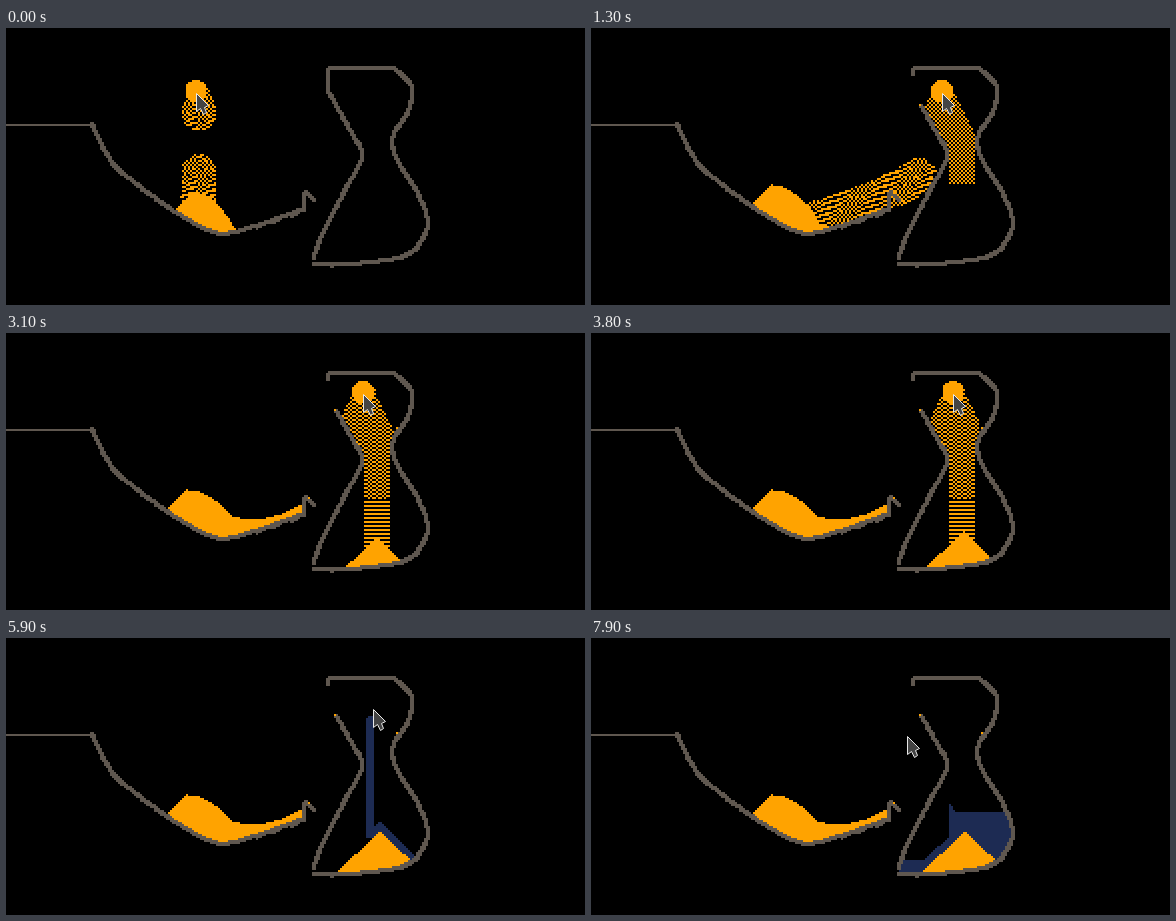
An HTML page with a canvas for the animation above (8 s loop, 579 by 277 pixels).

```html
<!DOCTYPE html>
<html lang="en">
<head>
<meta charset="utf-8">
<title>Falling sand</title>
<style>
html, body { margin: 0; width: 100%; height: 100%; overflow: hidden; background: #000; }
canvas { display: block; }
</style>
</head>
<body>
<canvas id="stage" width="579" height="277"></canvas>
<script>
const ctx = document.getElementById('stage').getContext('2d');
const LOOP = 8000, STEP = 100, CELL = 2, FALL = 0.14;
const SAND = '#ffa300', WATER = '#1d2b53', WALL = '#5f574f';
const POUR = 630, SAND_END = 3830, WATER_START = 4500, WATER_END = 6950;

const mix = (a, b, k) => a + (b - a) * k;
const ramp = (t, a, b) => Math.max(0, Math.min(1, (t - a) / (b - a)));
const easeOut = k => 1 - (1 - k) ** 2;

// Smooth curve through a few points
function spline(points) {
  const out = [], last = points.length - 1;
  for (let i = 0; i < last; i++) {
    const [a, b, c, d] = [i - 1, i, i + 1, i + 2].map(j => points[Math.max(0, Math.min(last, j))]);
    for (let u = 0; u < 1; u += 0.1) {
      out.push([0, 1].map(n => b[n] + u * (c[n] - a[n]) / 2
        + u * u * (a[n] - 2.5 * b[n] + 2 * c[n] - d[n] / 2)
        + u * u * u * (1.5 * (b[n] - c[n]) + (d[n] - a[n]) / 2)));
    }
  }
  return [...out, points[last]];
}

// Coordinate of a curve where its other axis has the value v
function cross(curve, v, axis) {
  const other = 1 - axis, i = curve.findIndex(p => p[axis] >= v);
  if (i < 0) return curve[curve.length - 1][other];
  if (i === 0) return curve[0][other];
  const p = curve[i - 1], q = curve[i];
  return mix(p[other], q[other], (v - p[axis]) / (q[axis] - p[axis]));
}
const yAt = (curve, x) => cross(curve, x, 0);
const xAt = (curve, y) => cross(curve, y, 1);

const bowl = spline([[86,95], [103,130], [125,152], [168,183], [200,201], [222,205], [255,196], [297,181]]);
const hook = [[297,181], [299,164], [307,171]];
const leftSide = spline([[330,77], [345,104], [356,128], [340,160], [318,203], [307,230]]);
const rightSide = spline([[388,40], [405,58], [402,84], [387,108], [391,132], [411,164], [422,195], [411,220]]);
const base = spline([[308,235], [326,237], [365,234], [395,229], [411,220]]);
const lid = [[322,46], [322,41], [330,40], [388,40]];
const lip = [[321,44], [322,62], [330,77]];

const tipX = t => 190 + 161 * easeOut(ramp(t, 330, 950)) + 11 * ramp(t, 2200, 3800)
  + 12 * ramp(t, 3800, 4500) - 7 * ramp(t, 4500, 4900) - 51 * ramp(t, 7000, 7900);
const tipY = t => 65 - 4 * ramp(t, 2200, 3100) + 10 * ramp(t, 3800, 4500) + 27 * ramp(t, 7000, 7900);

const snap = v => Math.floor(v / CELL) * CELL;
const cell = (x, y, size = CELL) => ctx.fillRect(snap(x), snap(y), size, size);
const grain = (x, y, phase) => (y / CELL + Math.floor(phase)) & 1;

function fillCells(x0, y0, x1, y1, test) {
  for (let y = snap(y0); y < y1; y += CELL) {
    for (let x = snap(x0); x < x1; x += CELL) if (test(x, y)) cell(x, y);
  }
}

function wall(path) {
  ctx.fillStyle = WALL;
  for (let i = 1; i < path.length; i++) {
    const [x, y] = path[i - 1], [x2, y2] = path[i];
    const n = Math.ceil(Math.hypot(x2 - x, y2 - y) / 2);
    for (let k = 0; k <= n; k++) cell(mix(x, x2, k / n) - 1, mix(y, y2, k / n) - 1, 4);
  }
}

function scenery(t) {
  [bowl, hook, lid, leftSide, rightSide, base].forEach(wall);
  if (t < 700) wall(lip);
  ctx.fillRect(0, 96, 86, 2);
  // ragged underside of the bowl
  for (let x = 250; x < 300; x += CELL) {
    if (Math.sin(x * 12.9) > 0) cell(x, yAt(bowl, x) + 3);
  }
}

// Surface of the sand in the bowl: a mound, then a hollow on its right
function bowlHeap(t) {
  const rise = ramp(t, 0, 800), settle = ramp(t, 800, 1700);
  const mid = mix(187, 180, rise), peak = mix(163, 156, rise);
  const bend = mix(0.022, 0.0128, settle);
  return x => {
    if (x < mid) return peak + mid - x;
    const mound = peak + bend * (x - mid) ** 2;
    const hollow = 185 + 30 * (1 - settle) - 0.0063 * (x - 246) ** 2;
    return x > 224 ? Math.min(mound, hollow) : mound;
  };
}

function dune(t) {
  const top = 234 - 42 * ramp(t, 1950, 4700) ** 0.35;
  const mid = 368 + 5 * ramp(t, 2200, 4500);
  return x => top + Math.abs(x - mid) * 0.96;
}

// Sand dropped on the way to the glass
function trail(t, surface) {
  ctx.fillStyle = SAND;
  for (let s = -1100; s <= Math.min(t, 700); s += 25) {
    if (s > -557 && s < -170) continue;
    const drop = FALL * (t - s), r = Math.min(18, 10 + drop * 0.35);
    const cx = tipX(s) + 2, cy = tipY(s) - 2 + drop;
    if (cy > 260) continue;
    fillCells(cx - r, cy - r, cx + r, cy + r, (x, y) => {
      if (Math.hypot(x - cx, y - cy) > r) return false;
      const outside = x < 304
        ? y < Math.min(surface(x), yAt(bowl, x))
        : y < 78 || y < 222 && x < xAt(leftSide, y) - 5;
      const wobble = 1.5 * Math.sin(x * 0.15 + y * 0.1);
      return outside && grain(x, y, Math.abs(x - 190) * 0.3 + wobble);
    });
  }
}

// Sand running through the neck of the glass
function stream(t, surface) {
  if (t < POUR) return;
  const ended = t > SAND_END, bx = tipX(t), by = tipY(t) - 2;
  const front = 62 + FALL * (t - POUR);
  const top = ended ? 62 + FALL * (t - SAND_END) : by - 4;
  ctx.fillStyle = SAND;
  fillCells(320, 50, 392, 236, (x, y) => {
    if (y > front || y < top + (ended ? Math.max(0, x - 358) : 0) || y >= surface(x)) return false;
    const neck = y > 122, spread = 11 + Math.max(0, y - by) * 0.5;
    const left = Math.max(bx - spread, neck ? 358 : xAt(leftSide, y));
    const right = Math.min(bx + spread, neck ? 384 : 387);
    if (x < left || x >= right) return false;
    const phase = t < 2700 ? x / 2 : !ended && y > 165 ? 0 : x * 0.35;
    return grain(x, y, phase + 1);
  });
}

// Grains that run down outside the glass
function drip(t) {
  ctx.fillStyle = SAND;
  const top = 226 + FALL * Math.max(0, t - 2250);
  const end = Math.min(272, 222 + FALL * (t - 1850));
  for (let y = 228; y < end; y += 4) if (y >= top) cell(304, y);
}

function water(t, surface) {
  if (t < WATER_START) return;
  ctx.fillStyle = WATER;
  const level = mix(222, 174, ramp(t, 5900, 7500));
  const pool = mix(234, 222, ramp(t, 6200, 7400));
  const reachR = 373 + (t - 5400) * 0.07, reachL = 361 - (t - 5950) * 0.13;

  for (let y = 78; y < 200; y += CELL) {
    const s = t - (y - 78) / FALL;
    const x = Math.max(362, tipX(s) - 1 - Math.min(2, (y - 78) / 30));
    if (s < WATER_START || s > WATER_END || y >= Math.min(level, surface(x))) continue;
    for (let dx = -4; dx < 4; dx += CELL) cell(x + dx, y);
  }
  if (t < 5400) return;
  fillCells(308, 160, 424, 238, (x, y) => {
    const depth = surface(x) - y;
    if (depth <= 0 || y >= yAt(base, x)) return false;
    if (x < xAt(leftSide, y) || x > xAt(rightSide, y)) return false;
    if (x < 358) return x > reachL && (x > 332 && depth < 10 || y >= pool);
    const film = x > 366 && x < reachR && depth < 9;
    const splash = t > 6900 ? Math.max(0, 9 - (x - 358) * 1.5) : 0;
    return film || t > 5900 && y >= level - splash;
  });
}

function heaps(t, heap, pile) {
  ctx.fillStyle = SAND;
  fillCells(160, 150, 300, 210, (x, y) => y >= heap(x) && y < yAt(bowl, x));
  if (t > 1950) fillCells(324, 188, 412, 238, (x, y) => y >= pile(x) && y < yAt(base, x));
}

function looseGrains(t) {
  ctx.fillStyle = SAND;
  if (t > 1000) { cell(328, 76); cell(302, 164); }
  if (t > 2300) cell(391, 95);
}

function brush(t) {
  if (t > SAND_END) return;
  const r = t > 330 && t < 950 ? 4 : 11, cx = tipX(t), cy = tipY(t) - 2;
  ctx.fillStyle = SAND;
  fillCells(160, 40, 380, 90, (x, y) => Math.hypot(x + 1 - cx, y + 1 - cy) < r);
}

function cursor(t) {
  ctx.save();
  ctx.translate(Math.round(tipX(t)) + 0.5, Math.round(tipY(t)) + 0.5);
  ctx.beginPath();
  [[0,0], [0,18], [4,15], [7,21], [10,19], [8,14], [12,12]].forEach(p => ctx.lineTo(...p));
  ctx.closePath();
  ctx.fillStyle = '#444';
  ctx.fill();
  ctx.strokeStyle = '#e8e8e8';
  ctx.stroke();
  ctx.restore();
}

function draw(t) {
  ctx.clearRect(0, 0, 579, 277);
  const heap = bowlHeap(t), pile = dune(t);
  trail(t, heap);
  stream(t, pile);
  drip(t);
  water(t, pile);
  heaps(t, heap, pile);
  scenery(t);
  looseGrains(t);
  brush(t);
  cursor(t);
}

const start = performance.now();
let shown = -1;
function tick() {
  const t = snap(0) + Math.floor(((performance.now() - start) % LOOP) / STEP) * STEP;
  if (t !== shown) draw(shown = t);
  requestAnimationFrame(tick);
}
tick();
</script>
</body>
</html>
```
